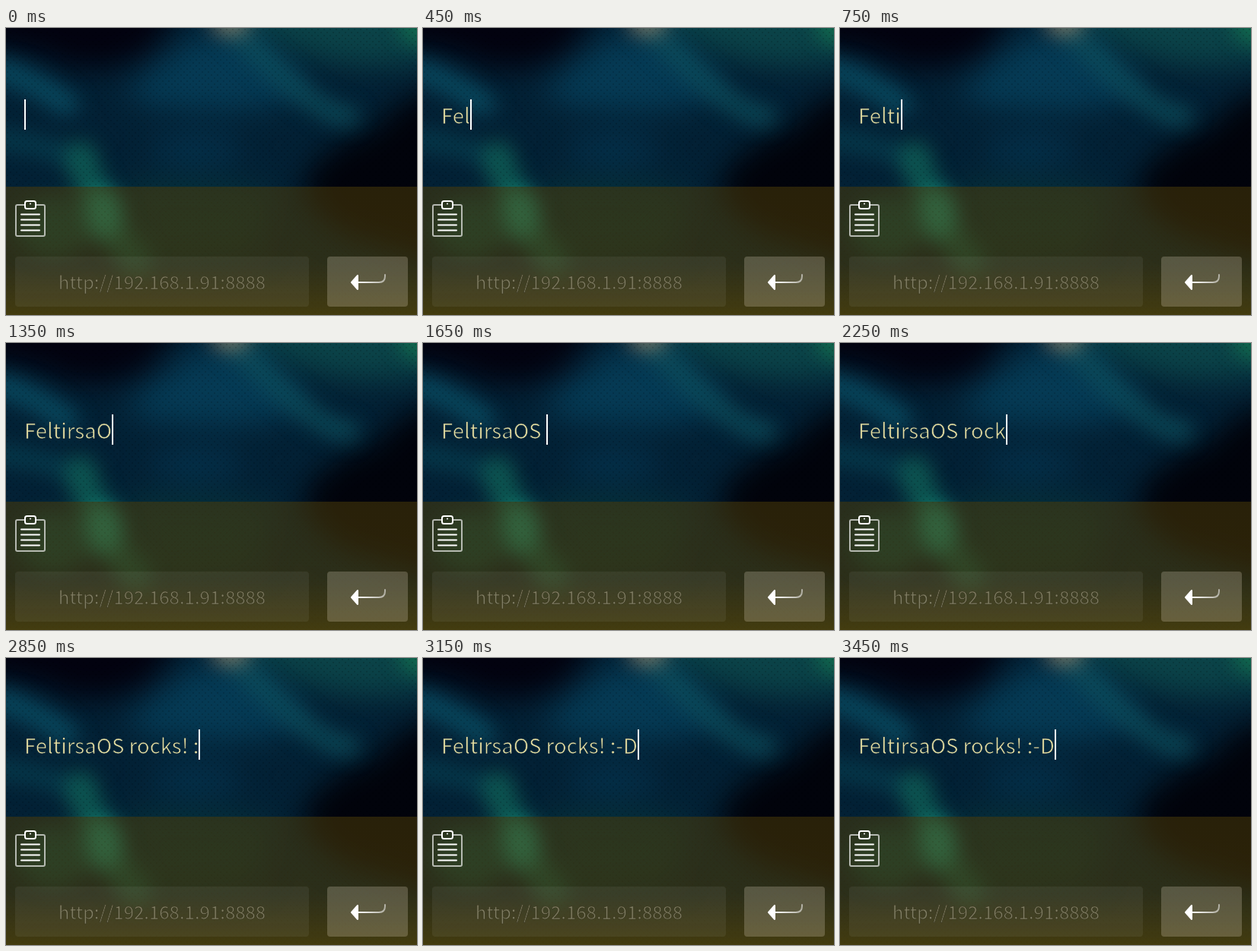
An HTML page that plays this animation: 540x378 px, repeating every 3600 ms.

```html
<!DOCTYPE html>
<html lang="en">
<head>
<meta charset="utf-8">
<style>
  html, body { margin: 0; width: 100%; height: 100%; overflow: hidden; background: #021a2c; }
  svg { display: block; width: 540px; height: 378px; }
  /* a thin dark outline slims the strokes to a light weight */
  text {
    font-family: "Noto Sans CJK JP", "Noto Sans CJK SC", "Noto Sans CJK", "Open Sans", sans-serif;
    font-weight: 300; white-space: pre; stroke-width: .7;
  }
  .line { fill: none; stroke-linecap: round; }
</style>
</head>
<body>
<svg viewBox="0 0 540 378">
  <defs>
    <filter id="soft" filterUnits="userSpaceOnUse" x="-120" y="-120" width="780" height="620" color-interpolation-filters="sRGB">
      <feGaussianBlur stdDeviation="19"/>
    </filter>
    <filter id="glow" filterUnits="userSpaceOnUse" x="-120" y="-120" width="780" height="620" color-interpolation-filters="sRGB">
      <feGaussianBlur stdDeviation="13"/>
    </filter>
    <linearGradient id="amber" x2="0" y2="1">
      <stop offset="0" stop-color="#4a3a0a" stop-opacity=".55"/>
      <stop offset=".6" stop-color="#4c3a06" stop-opacity=".57"/>
      <stop offset="1" stop-color="#604800" stop-opacity=".7"/>
    </linearGradient>
    <linearGradient id="fade" gradientUnits="userSpaceOnUse" x1="462" y1="0" x2="500" y2="0">
      <stop stop-color="#fff"/>
      <stop offset="1" stop-color="#fff" stop-opacity=".5"/>
    </linearGradient>
    <pattern id="dots" width="8" height="8" patternUnits="userSpaceOnUse">
      <path d="M1 1h2v2h-2zM5 5h2v2h-2z" fill="#000" opacity=".13"/>
    </pattern>
  </defs>

  <!-- wallpaper -->
  <rect width="540" height="378" fill="#032135"/>
  <g filter="url(#soft)">
    <path d="M-120-120H260Q225 18 170 42Q110 66 60 42Q20 22-120 26Z" fill="#02020f"/>
    <path d="M660 70Q520 70 490 130Q430 150 400 185Q370 220 440 270L660 340Z" fill="#01030b"/>
    <path d="M210 40Q270-10 330 10L400 80Q340 120 220 105Q150 100 165 75Z" fill="#053a54"/>
    <path d="M300-60H640V30Q500 55 440 45Q360 30 300-20Z" fill="#0b4348"/>
    <ellipse cx="250" cy="160" rx="60" ry="24" fill="#042f48"/>
    <path d="M150 205Q260 190 350 215L330 300L180 320Z" fill="#06303a"/>
  </g>
  <g filter="url(#glow)">
    <path class="line" d="M-60 48C10 52 45 78 80 100" stroke="#0a5268" stroke-width="30" opacity=".8"/>
    <path class="line" d="M-60 146Q20 142 90 172" stroke="#084354" stroke-width="26" opacity=".7"/>
    <path class="line" d="M300 5C335 35 360 65 395 90S430 112 450 116" stroke="#0e505e" stroke-width="28" opacity=".75"/>
    <path class="line" d="M98 170C110 200 115 240 170 305" stroke="#106458" stroke-width="42" opacity=".75"/>
    <ellipse cx="128" cy="245" rx="26" ry="34" fill="#16a58c" opacity=".8"/>
    <ellipse cx="62" cy="262" rx="50" ry="40" fill="#0c5450" opacity=".7"/>
    <circle cx="545" cy="-6" r="28" fill="#147a50" opacity=".7"/>
    <ellipse cx="295" cy="-6" rx="26" ry="14" fill="#9a8a70" opacity=".8"/>
  </g>
  <rect width="540" height="378" fill="url(#dots)"/>

  <!-- typed line -->
  <text id="typed" x="24" y="126" font-size="27.5" fill="#e8dfa2" stroke="#04253a"></text>
  <rect id="cursor" x="24" y="94" width="2" height="40" fill="#fff"/>

  <!-- keyboard panel -->
  <rect y="209" width="540" height="169" fill="url(#amber)"/>
  <rect x="12" y="301" width="386" height="66" rx="4" fill="#fff" opacity=".06"/>
  <rect x="422" y="301" width="106" height="66" rx="4" fill="#fed" opacity=".21"/>
  <text x="205" y="344" font-size="24" text-anchor="middle" fill="#807e64" stroke="#3c3a22">http://192.168.1.91:8888</text>

  <g class="line" stroke="#fff" stroke-width="2">
    <path d="M24 233H15Q13 233 13 235V272Q13 274 15 274H49Q51 274 51 272V235Q51 233 49 233H40" opacity=".65"/>
    <rect x="25" y="228" width="14" height="10" rx="2.5"/>
    <path d="M20 245.5H44M20 252.5H44M20 259.5H44M20 266.5H44"/>
    <path d="M32 231.5h.01"/>
    <path d="M463 335H490Q498 335 498 327V325" stroke="url(#fade)"/>
    <path d="M454 335L462 326V344Z" fill="#fff" stroke-linejoin="round"/>
  </g>
</svg>
<script>
  const LOOP = 3600, STEP = 150;
  const message = "FeltirsaOS rocks! :-D";
  const typed = document.getElementById("typed");
  const cursor = document.getElementById("cursor");

  function draw() {
    const count = Math.floor(performance.now() % LOOP / STEP);
    typed.textContent = message.slice(0, count);
    cursor.setAttribute("x", 24 + Math.round(count ? typed.getComputedTextLength() : 0));
    requestAnimationFrame(draw);
  }
  draw();
</script>
</body>
</html>
```
